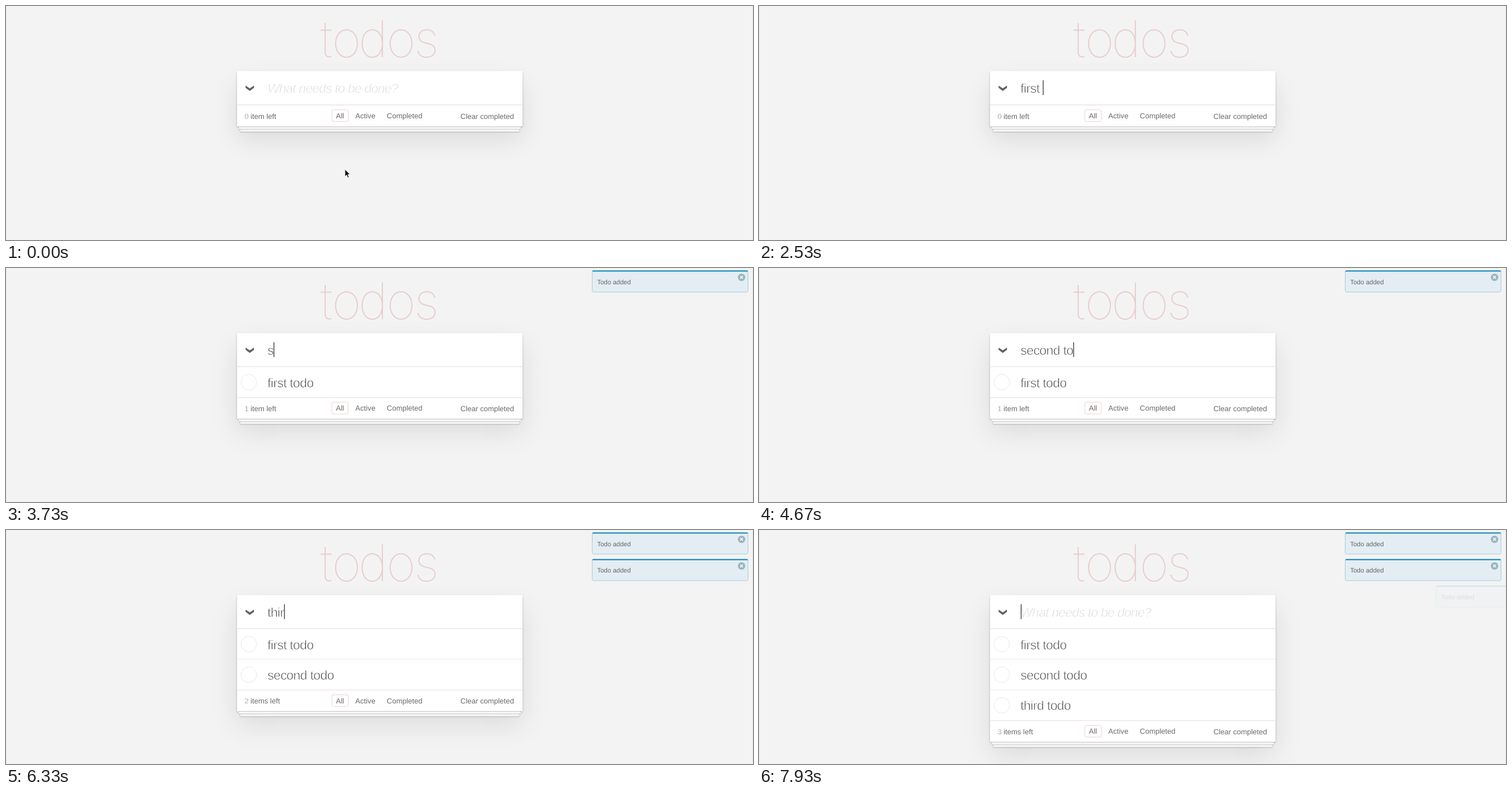
Recreate the animation shown at these times as an HTML page. Size 1280 by 402 pixels, loop 8000 ms.

```html
<!DOCTYPE html>
<html lang="en">
<head>
<meta charset="utf-8">
<title>todos</title>
<style>
  html, body { margin: 0; width: 100%; height: 100%; overflow: hidden; background: #f3f3f3; }
  #stage { position: relative; width: 1280px; height: 402px; overflow: hidden; }
  #card, #foot { position: absolute; left: 395.5px; width: 489px; background: #fff; }
  #card { top: 111.5px; box-shadow: 0 1.8px 3.6px rgba(0,0,0,.2), 0 22px 44px rgba(0,0,0,.1); }
  #head { height: 58px; box-shadow: inset 0 -1.8px .9px rgba(0,0,0,.03); }
  #foot {
    height: 36.7px;
    box-shadow: 0 .9px .9px rgba(0,0,0,.2),
      0 7.1px 0 -2.7px #f6f6f6, 0 8px .9px -2.7px rgba(0,0,0,.2),
      0 14.2px 0 -5.3px #f6f6f6, 0 15.1px 1.8px -5.3px rgba(0,0,0,.2);
  }
  svg { position: absolute; left: 0; top: 0; }
  text {
    font: 12.6px "Liberation Sans", Arial, sans-serif;
    fill: #6a6a6a; white-space: pre; text-rendering: geometricPrecision;
  }
  #title { font: 100 87px Inter, "Roboto", sans-serif; fill: #e8cdce; text-anchor: middle; }
  /* a background-coloured outline gives the light weight */
  .entry { font-size: 22px; letter-spacing: -.55px; fill: #484848; stroke: #fff; stroke-width: .7px; }
  #hint { font-style: italic; letter-spacing: -.73px; fill: #dcdcdc; }
  .digit { fill: #777; stroke: #fff; stroke-width: .4px; }
  .note { font-size: 11px; fill: #666; }
</style>
</head>
<body>
<div id="stage">
  <div id="card"><div id="head"></div></div>
  <div id="foot"></div>
  <svg width="1280" height="402" viewBox="0 0 1280 402">
    <path d="M.5 0V402M1279.5 0V402" stroke="#e9e9e9"/>
    <text id="title" x="549 583.5 629 677 720.5" y="87.5">todos</text>
    <path d="M410.5 136.8L417.7 141.4L425 136.8V140.6L417.7 146L410.5 140.6Z" fill="#606060"/>
    <text id="hint" class="entry" x="448" y="148.5">What needs to be done?</text>
    <text id="input" class="entry" x="448" y="148.5"></text>
    <rect id="caret" y="127.5" width="1.4" height="25.5" fill="#444"/>
    <g id="items"></g>
    <g id="bar">
      <path d="M395.5 .2H884.5" stroke="#e2e2e2"/>
      <text class="digit" id="count" x="408.7" y="23.7"></text>
      <text id="left" x="419" y="23.7"></text>
      <rect x="558.4" y="8.3" width="28" height="20.2" rx="2.7" fill="none" stroke="#ecd3d3"/>
      <text x="565.3" y="22.8">All</text>
      <text x="598.6" y="22.8">Active</text>
      <text x="652.6" y="22.8">Completed</text>
      <text x="778.8" y="23.7">Clear completed</text>
    </g>
    <g id="toasts"></g>
    <path id="arrow" d="M0 0V12.6L2.9 9.9L5 14.7L7.1 13.8L5.1 9.1H9Z" fill="#111" stroke="#fff" stroke-width=".9"/>
    <path id="beam" d="M-3 -7.5Q0 -7.5 0 -5.5Q0 -7.5 3 -7.5M0 -5.5V5.5M-3 7.5Q0 7.5 0 5.5Q0 7.5 3 7.5" fill="none" stroke="#333"/>
  </svg>
</div>
<script>
const RATE = 15, TICKS = 120, ROW = 52.45, FOCUS = 13, BLINK = 8;

// key presses, submit and first visible toast step, all in ticks
const TODOS = [
  { text: "first todo", keys: [28, 30, 32, 34, 36, 38, 41, 43, 44, 46], enter: 48, toast: 50 },
  { text: "second todo", keys: [56, 57, 60, 62, 63, 65, 66, 68, 70, 76, 78], enter: 80, toast: 82 },
  { text: "third todo", keys: [91, 92, 93, 95, 100, 103, 106, 108, 110, 112], enter: 118, toast: 119 }
];
const PRESSES = [FOCUS, ...TODOS.flatMap(todo => [...todo.keys, todo.enter])];

const $ = id => document.getElementById(id);
const show = (el, on) => el.setAttribute("display", on ? "inline" : "none");
const move = (el, x, y) => el.setAttribute("transform", `translate(${x} ${y})`);
const clamp = v => Math.min(1, Math.max(0, v));
const mix = (a, b, p) => a + (b - a) * p;
const smooth = p => p * p * (3 - 2 * p);

function group(parent, markup) {
  const g = document.createElementNS("http://www.w3.org/2000/svg", "g");
  g.innerHTML = markup;
  return parent.appendChild(g);
}

const items = TODOS.map(({ text }, i) => {
  const g = group($("items"), `
    <path d="M395.5 .2H884.5" stroke="${i ? "#e8e8e8" : "#e2e2e2"}"/>
    <circle cx="416" cy="26.6" r="13.4" fill="#fff" stroke="#e9e9e9"/>
    <text class="entry" x="448" y="35">${text}</text>`);
  move(g, 0, 169.5 + i * ROW);
  return g;
});

const toasts = TODOS.map(() => group($("toasts"), `
  <rect x=".5" y=".5" width="267" height="36.8" rx="2.7" fill="#e3edf3" stroke="#a9cede"/>
  <path d="M.4 2.2Q.6 0 2.7 0H265.3Q267.4 0 267.6 2.2Z" fill="#2b92bd"/>
  <text class="note" x="9" y="23.7">Todo added</text>
  <circle cx="256.4" cy="12" r="6.3" fill="#98b4bd"/>
  <path d="M254 9.6l4.8 4.8m0 -4.8l-4.8 4.8" stroke="#f1f7fa" stroke-width="1.6"/>`));

function drawInput(tick) {
  const todo = TODOS.find(({ enter }) => tick < enter);
  const typed = todo ? todo.text.slice(0, todo.keys.filter(k => k <= tick).length) : "";
  $("input").textContent = typed;
  show($("hint"), !typed);
  const last = Math.max(...PRESSES.filter(k => k <= tick));
  show($("caret"), tick >= FOCUS && Math.floor((tick - last) / BLINK) % 2 === 0);
  $("caret").setAttribute("x", 448.5 + (typed ? $("input").getComputedTextLength() - .5 : 0));
}

function drawList(tick) {
  const count = TODOS.filter(({ enter }) => enter <= tick).length;
  items.forEach((item, i) => show(item, i < count));
  const top = 169.9 + count * ROW;
  $("card").style.height = top + 36.7 - 111.5 + "px";
  $("foot").style.top = top + "px";
  move($("bar"), 0, top);
  $("count").textContent = count;
  $("left").textContent = count > 1 ? "items left" : "item left";
}

function drawToasts(tick) {
  toasts.forEach((toast, i) => {
    const p = clamp((tick - TODOS[i].toast + 1) / 4);
    show(toast, p > 0);
    move(toast, mix(1280, 1004, 1 - (1 - p) ** 2), 4 + i * 45.7);
    toast.setAttribute("opacity", p ** 1.4);
  });
}

function drawPointer(tick) {
  const p = smooth(clamp(tick / 6));
  show($("arrow"), tick < 10);
  move($("arrow"), mix(580.8, 505.3, p), mix(280.5, 166.3, p));
  show($("beam"), tick >= 10 && tick < TODOS[0].keys[0]);
  move($("beam"), 507, mix(159, 151, clamp((tick - 10) / 2)));
}

function frame(now) {
  const tick = Math.floor(now * RATE / 1000 + .06) % TICKS;
  drawInput(tick);
  drawList(tick);
  drawToasts(tick);
  drawPointer(tick);
}

const start = performance.now();
(function loop() {
  frame(performance.now() - start);
  requestAnimationFrame(loop);
})();
</script>
</body>
</html>
```
